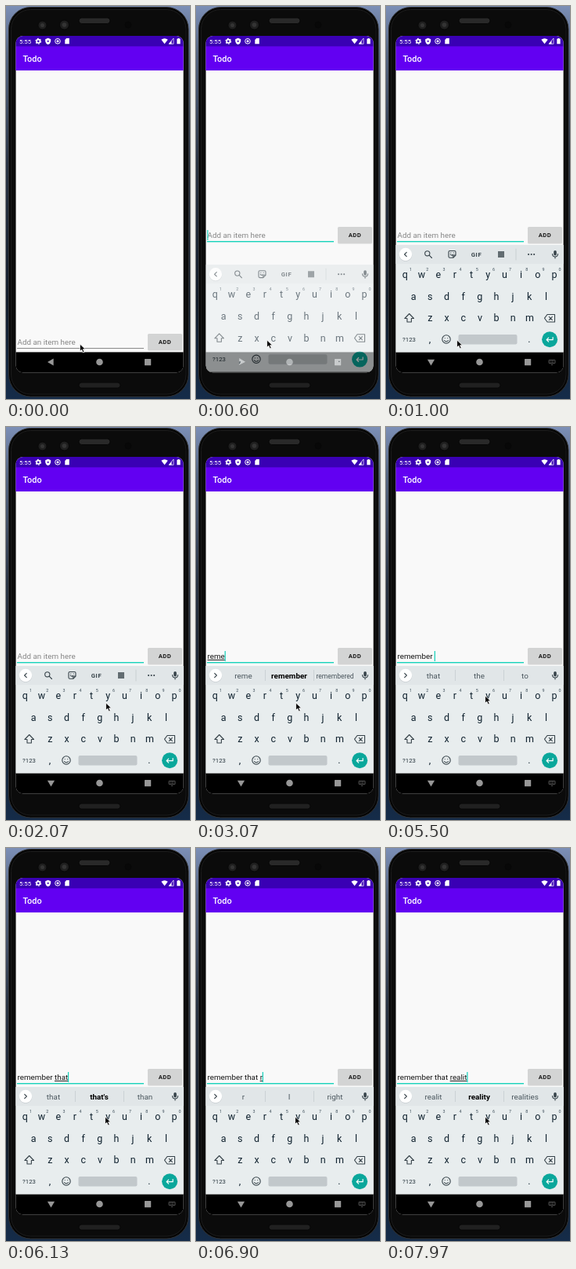
An HTML page for the animation above (8 s loop, 235x500 px).

```html
<!DOCTYPE html>
<html lang="en">
<head>
<meta charset="utf-8">
<title>Todo</title>
<style>
  html, body { margin: 0; width: 100%; height: 100%; overflow: hidden; background: #101a28; }
  svg { display: block; width: 100vw; height: 100vh; }
  text { font-family: Roboto, sans-serif; white-space: pre; }
  .mid { text-anchor: middle; }
  .line { fill: none; stroke: #37434a; stroke-width: 1.1; stroke-linecap: round; stroke-linejoin: round; }
  .key { font-size: 12.5px; fill: #10222f; }
  .hint { font-size: 5.4px; fill: #3d4d59; }
  .small { font-size: 7.8px; fill: #26343d; }
  .word { font-size: 9.9px; fill: #4a565d; }
  .entry { font-size: 9.86px; }
  .strong { font-weight: 700; fill: #000; }
</style>
</head>
<body>
<svg viewBox="0 0 235 500" preserveAspectRatio="none">
  <defs>
    <linearGradient id="wall" x2="0" y2="1">
      <stop offset="0" stop-color="#7c8fb6"/>
      <stop offset=".12" stop-color="#566682"/>
      <stop offset=".4" stop-color="#2a3443"/>
      <stop offset=".75" stop-color="#131d2b"/>
      <stop offset="1" stop-color="#152c49"/>
    </linearGradient>
    <clipPath id="screen"><rect x="12.600" y="38" width="214" height="428.300" rx="9"/></clipPath>
  </defs>

  <rect width="235" height="500" fill="url(#wall)"/>
  <rect x="3.500" y="1.500" width="229.500" height="495.500" rx="28" fill="#050505" stroke="#303030"/>
  <rect x="6.500" y="4.500" width="223.500" height="489.500" rx="25" fill="#0b0b0b" stroke="#1d1d1d"/>
  <g stroke="#070707" fill="#1f1f1f">
    <rect x="93" y="15" width="40" height="7.500" rx="3.700" fill="#292929"/>
    <rect x="93" y="479" width="53" height="7" rx="3.500" fill="#202020"/>
    <circle cx="46.500" cy="24.500" r="5.500"/>
    <circle cx="74.500" cy="24" r="6"/>
    <circle cx="156" cy="24" r="4" fill="#080808"/>
  </g>
  <circle cx="46.500" cy="24.500" r="2.500" fill="#343434"/>
  <circle cx="74.500" cy="24" r="2.800" fill="#343434"/>

  <g clip-path="url(#screen)">
    <rect x="12" y="38" width="215" height="429" fill="#f9f9f9"/>
    <rect x="12" y="51" width="215" height="31" fill="#6200f2"/>
    <rect x="12" y="38" width="215" height="13.300" fill="#3a00b4"/>
    <text x="21.500" y="71" font-size="10.950" font-weight="500" fill="#fff">Todo</text>

    <g fill="#fff">
      <text x="17" y="47.500" font-size="7.900">5:55</text>
      <circle cx="41.300" cy="44.800" r="2.200" fill="none" stroke="#fff" stroke-width="1.700"/>
      <circle cx="41.300" cy="44.800" r="3.400" fill="none" stroke="#fff" stroke-width="1.100" stroke-dasharray="1.780"/>
      <path d="M53.700 40.800 57.200 42.200V45Q56.700 48 53.700 49 50.700 48 50.200 45V42.200Z"/>
      <circle cx="53.700" cy="44.800" r="1.100" fill="#3a00b4"/>
      <circle cx="66" cy="44.800" r="3.300" fill="none" stroke="#fff"/>
      <circle cx="66" cy="44.800" r="1.500"/>
      <path d="M75.300 43 77.200 41H80.800V48.300H75.300Z"/>
      <path d="M198.300 42.800Q202.500 39.600 206.700 42.800L202.500 48.300Z"/>
      <path d="M208 48.200 211.500 44V48.200Z"/>
      <path d="M208 48.200 214 41V48.200Z" fill="none" stroke="#fff" stroke-width=".7"/>
      <path d="M218.300 41.800H219.500V41H221.500V41.800H222.600V48.300H218.300Z"/>
    </g>

    <g id="inputRow">
      <rect x="181" y="418" width="44" height="20.500" rx="1.500" fill="#b9baba" opacity=".55"/>
      <rect x="181" y="417" width="44" height="20.500" rx="1.500" fill="#d3d4d4"/>
      <text class="mid" x="203" y="429.800" font-size="7.700" font-weight="700" letter-spacing=".4" fill="#1b1b1b">ADD</text>
      <rect id="underline" x="14" y="435" width="162"/>
      <text id="hint" class="entry" x="14.500" y="430.900" fill="#878787">Add an item here</text>
      <text class="entry" x="14.500" y="430.900" fill="#181818"><tspan id="done"></tspan><tspan id="composing" text-decoration="underline"></tspan></text>
      <rect id="caret" y="421" width="1.200" height="13" fill="#14d0b9"/>
    </g>

    <g fill="#979797">
      <rect x="12" y="440.400" width="215" height="26" fill="#000"/>
      <path id="back" d="M-4.500 0 3.200-4.600V4.600Z"/>
      <circle cx="119.500" cy="453" r="4.300"/>
      <rect x="177" y="449" width="8.200" height="8.200" rx=".5"/>
      <g id="switcher" fill="none" stroke="#686868" stroke-width=".8">
        <rect x="208" y="450.300" width="8" height="4.300" rx=".5"/>
        <path d="M209.300 451.700H215M209.300 453.200H215" stroke-dasharray=".8 .6"/>
        <path d="M211 456 212 456.900 213 456"/>
      </g>
    </g>

    <g id="keyboard">
      <rect x="12" y="304" width="215" height="136.400" fill="#e8edee"/>
      <rect x="12" y="304" width="215" height="24" fill="#e1e6e8"/>
      <circle cx="25" cy="316.700" r="8.300" fill="#c5cbce"/>
      <circle cx="25" cy="316" r="8.200" fill="#fff"/>
      <path id="chevron" class="line" d="M1.300-2.700-1.400 0 1.300 2.700"/>
      <g class="line">
        <rect x="214.200" y="311" width="3.600" height="6.500" rx="1.800" fill="#37434a" stroke="none"/>
        <path d="M212.500 315.500Q212.700 319 216 319T219.500 315.500M216 319V321"/>
      </g>
      <g id="tools" class="line">
        <circle cx="52.800" cy="314.800" r="3.100"/><path d="M55.200 317.200 58.500 320.500"/>
        <path d="M81.500 311.500H87.500Q89 311.500 89 313V317L85.800 320.300H81.500Q80 320.300 80 318.800V313Q80 311.500 81.500 311.500ZM85.800 320.300V317H89"/>
        <path d="M82.300 316Q84 318 85.500 316.500M82.800 313.800V313.900M86.200 313.800V313.900"/>
        <text class="mid" x="115.500" y="318.800" font-size="7.800" font-weight="700" letter-spacing=".5" fill="#37434a" stroke="none">GIF</text>
        <rect x="143" y="312" width="8" height="8" fill="#626c71" stroke="none"/>
        <path d="M166 309V323" stroke="#cbd1d4"/>
        <path d="M182 316H182.100M185.600 316H185.700M189.100 316H189.200" stroke-width="2"/>
      </g>
      <g id="suggestions">
        <path d="M88.500 309V323M150.500 309V323" stroke="#c6ccd0" stroke-width=".8"/>
        <text class="word mid" x="60.500" y="319.700"></text>
        <text class="word mid" x="119" y="319.700"></text>
        <text class="word mid" x="177.500" y="319.700"></text>
      </g>
      <g id="keys"></g>
      <g class="line">
        <path d="M29.700 391.500 23.900 397.500H27V402H32.400V397.500H35.500Z"/>
        <path d="M206 392.500H215.500V402H206L202.500 397.200ZM208.300 395.300 212.300 399.300M212.300 395.300 208.300 399.300"/>
        <circle cx="77" cy="424" r="5.200"/>
        <path d="M74.500 425.500Q77 428.300 79.500 425.500M75.200 422.500V422.600M78.800 422.500V422.600"/>
      </g>
      <text class="small mid" x="29.500" y="426.500">?123</text>
      <rect x="92.500" y="418" width="75" height="12.500" rx="2" fill="#c2c8cb"/>
      <circle cx="209.100" cy="424.300" r="10" fill="#0aa79b"/>
      <path class="line" d="M213.100 421.500V424.700H205.100M207.600 422.200 205.100 424.700 207.600 427.200" style="stroke:#fff;stroke-width:1.200"/>
    </g>
  </g>

  <path id="pointer" d="M0 0V9.300L2.200 7.300 3.900 11 5.700 10.200 4 6.700H7Z" fill="#000" stroke="#fff" stroke-width=".8"/>
</svg>

<script>
const LOOP = 8000, FOCUS = 470, SLIDE_START = 480, SLIDE_TIME = 200, RESIZE = 540, LIFT = 136;
const $ = id => document.getElementById(id);
const clamp = x => Math.min(1, Math.max(0, x));
const smooth = x => x * x * (3 - 2 * x);

// time, text, suggestions
const edits = [
  [2330, "r", "r I right"],
  [2530, "re", "re are really"],
  [2790, "rem", "rem remember remind"],
  [3000, "reme", "reme remember remembered"],
  [3260, "remem", "remem remember remembered"],
  [3500, "rememb", "rememb remember remembered"],
  [3700, "remembe", "remembe remember remembered"],
  [3920, "remember", "remember remembered remembering"],
  [4200, "remember ", "that the to"],
  [5660, "remember t", "t the to"],
  [5820, "remember th", "th the that"],
  [5970, "remember tha", "tha that than"],
  [6130, "remember that", "that that's than"],
  [6340, "remember that ", "I the you"],
  [6760, "remember that r", "r I right"],
  [7060, "remember that re", "re are really"],
  [7280, "remember that rea", "rea really read"],
  [7470, "remember that real", "real really reality"],
  [7670, "remember that reali", "reali reality realize"],
  [7870, "remember that realit", "realit reality realities"]
].map(([time, text, words]) => ({ time, text, words: words.split(" ") }));

// start, end, x, y
const moves = [[30, 330, 90.6, 425], [1320, 2050, 127.6, 351], [3200, 3600, 126.6, 342]];

const ruler = document.createElement("canvas").getContext("2d");
ruler.font = "9.86px Roboto, sans-serif";

function set(id, attributes) {
  for (const name in attributes) $(id).setAttribute(name, attributes[name]);
}

function show(id, visible) {
  $(id).style.display = visible ? "" : "none";
}

function addKey(label, x, y, kind = "key") {
  const node = document.createElementNS("http://www.w3.org/2000/svg", "text");
  node.setAttribute("class", kind + " mid");
  node.setAttribute("x", x);
  node.setAttribute("y", y);
  node.textContent = label;
  $("keys").append(node);
}

[["qwertyuiop", 24.4, 346], ["asdfghjkl", 35.1, 373.7], ["zxcvbnm", 56.4, 401.3]].forEach(([row, x, y], r) =>
  [...row].forEach((label, i) => {
    addKey(label, x + i * 21.17, y);
    if (!r) addKey((i + 1) % 10, x + i * 21.17 + 7.2, 337, "hint");
  }));
addKey(",", 56, 427.5);
addKey(".", 183, 427.5);

function drawText(t) {
  const edit = edits.filter(e => e.time <= t).pop();
  const text = edit ? edit.text : "";
  const split = text.lastIndexOf(" ") + 1;
  $("done").textContent = text.slice(0, split);
  $("composing").textContent = text.slice(split);
  show("hint", !edit);
  show("tools", !edit);
  show("suggestions", edit);
  set("chevron", { transform: `translate(25 316) scale(${edit ? -1 : 1} 1)` });

  const sinceEdit = t - (edit ? edit.time : FOCUS);
  show("caret", sinceEdit >= 0 && sinceEdit % 1000 < 500);
  set("caret", { x: 14.3 + ruler.measureText(text).width });

  if (!edit) return;
  const completes = text.length - split > 2;
  $("suggestions").querySelectorAll("text").forEach((node, i) => {
    const word = edit.words[i];
    node.textContent = word;
    node.classList.toggle("strong", i === 1 && completes);
    node.style.fontSize = i === 2 && word.length > 9 ? "8.5px" : "";
  });
}

function drawKeyboard(t) {
  const p = clamp((t - SLIDE_START) / SLIDE_TIME);
  const focused = t >= FOCUS;
  set("keyboard", { transform: `translate(0 ${162 * (1 - p) ** 2})`, opacity: p });
  set("back", { transform: `translate(57.5 453) rotate(${-90 * smooth(p)})` });
  show("switcher", p === 1);
  set("inputRow", { transform: `translate(0 ${t < RESIZE ? 0 : -LIFT})` });
  set("underline", { height: focused ? 1.4 : 1, fill: focused ? "#18d2bb" : "#8a8a8a" });
}

function drawPointer(t) {
  let x = 94.4, y = 430;
  for (const [start, end, toX, toY] of moves) {
    const p = smooth(clamp((t - start) / (end - start)));
    x += (toX - x) * p;
    y += (toY - y) * p;
  }
  set("pointer", { transform: `translate(${x} ${y})` });
}

const begin = performance.now();
function draw() {
  const t = (performance.now() - begin) % LOOP;
  drawText(t);
  drawKeyboard(t);
  drawPointer(t);
  requestAnimationFrame(draw);
}
draw();
</script>
</body>
</html>
```
